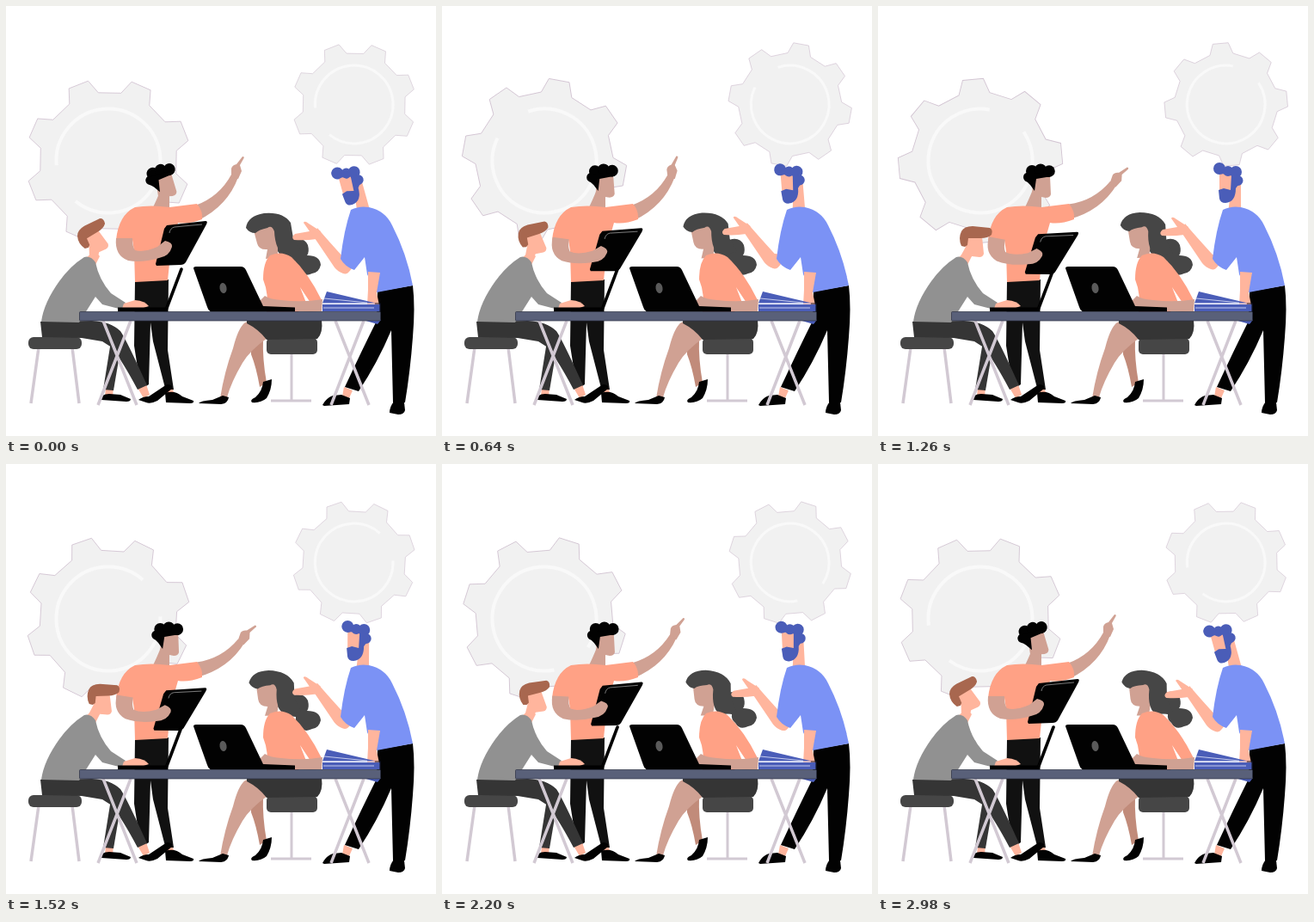
Write an HTML page that moves like this. It is 500x500 px and loops after 3 s.

```html
<!DOCTYPE html>
<html lang="en">
<head>
<meta charset="utf-8">
<title>Team at work</title>
<style>
html, body { margin: 0; width: 100%; height: 100%; overflow: hidden; background: #fff; }
svg { display: block; width: 100vw; height: 100vh; }
.tan { fill: #d0a193; }
.skin { fill: #ffb59d; }
.coral { fill: #ffa185; }
.black { fill: #020202; }
.dark { fill: #353535; }
.hair { fill: #464646; }
.blue { fill: #4a5db8; }
.leg { fill: none; stroke: #d2c9d3; stroke-width: 3.5; }
</style>
</head>
<body>
<svg viewBox="0 0 500 500">
  <defs>
    <g id="gear">
      <path id="teeth" fill="#f1f1f1" stroke="#d3c5d3" stroke-width=".9"/>
      <circle r="60.5" pathLength="360" stroke-dasharray="314 46" transform="rotate(175)" fill="none" stroke="#f9f9f9" stroke-width="4"/>
    </g>
  </defs>
  <g transform="translate(119 180)"><use href="#gear" class="spin"/></g>
  <g transform="translate(404.7 114.5) scale(.75)"><use href="#gear" class="spin"/></g>

  <!-- standing presenter -->
  <path class="tan" d="M181 211L190 217 190 236H170Q175 226 181 211Z"/>
  <g id="presenterHead">
    <path class="tan" d="M181 198H200L201 219Q200 223 195 223L190 222 188 230 178 228Z"/>
    <g class="black">
      <circle cx="174.500" cy="199" r="5.500"/><circle cx="179" cy="192" r="7"/><circle cx="189" cy="190.500" r="7"/><circle cx="199" cy="192" r="6.800"/>
      <path d="M173 195L203 194Q204 199 196 199L184 201 183 208 182 215 177 208 172 203Z"/>
    </g>
  </g>
  <path fill="#111" d="M150 320L189 318 188 400 195 446 186 448 171 390 168 368 166 440 157 446 149 395Z"/>
  <path class="skin" d="M186 446L194 446 196 452 187 453Z"/>
  <path class="black" d="M185 450Q196 446 205 454L218 459Q219 462 214 462L186 461Z"/>
  <g id="pointArm">
    <path class="tan" d="M220 232Q248 222 262 196L270 199Q258 232 224 249Z"/>
    <path id="pointHand" class="tan" d="M262 199V189Q263 185 268 184L275 175Q278 175 276 178L272 185 274 192 270 201Z"/>
  </g>
  <path class="coral" d="M150 234Q168 231 190 234L222 230Q229 238 228 248Q212 254 200 252L192 280 188 319 150 321 149 285 147 272 128 272Q131 243 150 234Z"/>
  <path id="board" class="black" d="M187 255L232 250Q235 250 233 254L209 298Q207 301 203 301L175 302 174 300 184 259Z"/>
  <path id="boardEdge" d="M190 264Q191 258 196 257L228 254" fill="none" stroke="#858585" stroke-width=".9"/>
  <path id="holdArm" class="tan" d="M128 270Q126 290 142 296Q158 299 178 293Q190 291 193 280Q194 275 185 273L176 280Q160 287 150 284Q147 280 147 270Z"/>

  <!-- seated man -->
  <path class="leg" d="M38 397L29 462M77 397L85 462"/>
  <rect class="hair" x="26" y="385" width="62" height="14" rx="6"/>
  <path class="skin" d="M116 444L125 444 124 454 115 454Z"/>
  <path class="black" d="M111 458Q110 451 120 451L133 452 145 457Q145 460 140 460Z"/>
  <path class="dark" d="M122 390L134 394 125 447 113 446Z"/>
  <path class="skin" d="M153 444L163 440 167 452 160 456Z"/>
  <path class="black" d="M154 458Q159 454 166 454L187 440Q194 440 193 445L176 459Q168 463 163 461Z"/>
  <path class="dark" d="M40 367L100 366Q122 367 133 378Q140 388 164 441L153 446Q136 414 123 397L112 390 88 386 42 385Z"/>
  <path class="skin" d="M91 295L103 284 109 291 104 301Z"/>
  <g id="sitterHead">
    <path class="skin" d="M102 268H121L123 288Q122 292 118 292L109 291 102 298 96 291 102 280Z"/>
    <path fill="#a8674f" d="M97 279Q93 270 97 262Q100 256 110 256L130 258Q134 260 132 266Q128 270 119 270H105L104 278 101 280Z"/>
  </g>
  <path fill="#919191" d="M91 292Q98 290 104 298Q108 318 122 334L139 345 135 353 112 347 104 338 85 368 41 367Q44 345 62 320Q75 302 91 292Z"/>
  <path class="skin" d="M137 346L150 342Q162 343 166 349L160 351 135 352Z"/>
  <path d="M204 306L187 351" stroke="#000" stroke-width="3.6" stroke-linecap="round"/>
  <rect x="130" y="350.5" width="58" height="5"/>

  <!-- seated woman -->
  <path fill="none" stroke="#d2c9d3" stroke-width="3" d="M332 404V459M308 459H355"/>
  <rect class="hair" x="303" y="386" width="59" height="19" rx="5"/>
  <path fill="#c18b7a" d="M285 386L299 387Q298 410 303 438L295 443Q291 420 285 405Z"/>
  <path class="black" d="M299 437L309 434Q309 446 303 456Q296 462 286 461Q283 458 290 455Q298 448 299 437Z"/>
  <path class="tan" d="M288 365L304 386Q284 400 275 415Q262 437 257 455L249 456Q254 425 264 398Q270 374 278 368Z"/>
  <path class="black" d="M224 462Q226 459 240 458L252 453 259 455Q258 462 250 463Z"/>
  <path class="dark" d="M280 365H367Q369 380 362 387L303 388Q294 376 280 369Z"/>
  <path id="curls" class="hair" d="M320 246Q332 254 334 266Q346 262 351 272Q353 280 350 284Q365 284 366 295Q364 304 356 305Q346 310 341 301Q336 297 337 291Q320 290 314 275Z"/>
  <g id="womanHead">
    <path class="tan" d="M288 261L306 252 316 262 316 292 302 294 304 283Q294 284 292 276Z"/>
    <path class="hair" d="M279 258Q281 244 300 241Q322 239 331 252L334 270 343 284 325 290Q313 285 312 262Q309 254 304 258Q294 260 290 264Q283 264 279 258Z"/>
  </g>
  <path class="coral" d="M307 290Q320 284 332 292Q352 311 367 342L354 345 342 327 349 345 340 356H303Q306 335 299 318Q299 298 307 290Z"/>
  <path class="tan" d="M368 341L367 355Q340 357 297 350L293 345 301 337Q306 341 320 342Q345 345 368 341Z"/>
  <path class="black" d="M218 305Q218 303 221 303H273Q277 303 279 307L299 349 336 350.500V355.500H238Q235 354 234 350Z"/>
  <ellipse cx="252.500" cy="328" rx="4" ry="6" fill="#5a5a5a" transform="rotate(-10 252.500 328)"/>

  <!-- bearded man -->
  <path class="skin" d="M393 443L403 447 399 456 391 454ZM450 456H463V464H450Z"/>
  <path class="black" d="M368 464Q372 456 380 453L390 452 400 456 399 463 370 465ZM446 473Q446 466 451 460L463 461 464 470Q463 475 456 475Z"/>
  <path class="black" d="M432 332L473 325Q476 350 473 385Q470 425 464 461H450L448 377Q432 415 410 448L394 443Q414 400 431 366Z"/>
  <g id="beardHead">
    <path class="skin" d="M397 195H412L422 205 422 242H407L409 224 397 220Z"/>
    <g class="blue">
      <circle cx="397" cy="189" r="7"/><circle cx="407" cy="192" r="6"/><circle cx="416" cy="193" r="7"/><circle cx="418.500" cy="203" r="6"/>
      <path d="M395 190L412 190 422 204 416 212Q416 228 404 229Q398 229 397 224L396 214 402 212 410 214 411 196 397 195Z"/>
    </g>
  </g>
  <g id="raisedArm" class="skin">
    <path d="M362 258Q373 271 394 294L406 295Q400 314 392 311Q386 309 382 304L359 270Z"/>
    <path d="M361 271Q348 273 335 272Q331 269 336 265L353 262 346 252Q347 249 352 253L366 262Z"/>
  </g>
  <path fill="#7b92f5" d="M401 237Q411 232 422 234Q441 238 449 255Q466 288 473 325L431 333 420 312 417 292 405 307Q394 303 389 294Q393 260 401 237Z"/>
  <path class="skin" d="M421 309L435 310 431 333 434 348H420L421 330Z"/>

  <!-- table and books -->
  <path class="blue" d="M415 365H436L432 370Z"/>
  <path class="blue" d="M373 332L430 345.500H368ZM368 347H435V355H368Z"/>
  <path d="M370 340L420 345M368 346.200H428M369 351H428" stroke="#e4e8fa" stroke-width=".8"/>
  <path d="M429 346H435V355" fill="none" stroke="#15182c" stroke-width="1.200"/>
  <path class="leg" d="M113 366L152 464M145 366L107 464M383 366L422 464M416 366L378 464"/>
  <rect x="85.500" y="355.500" width="350" height="10.500" rx="1" fill="#596079" stroke="#2b3042" stroke-width=".7"/>
</svg>
<script>
const LOOP = 3000;
const TIMES = [0, 400, 900, 1260, 1800, 2580];
const $ = id => document.getElementById(id);
const put = (id, value) => $(id).setAttribute('transform', value);
const clamp = x => Math.max(0, Math.min(1, x));

// Smooth periodic curve through one value per entry of TIMES
function curve(values) {
  const n = TIMES.length;
  const point = i => {
    const turn = Math.floor(i / n), k = i - turn * n;
    return [TIMES[k] + turn * LOOP, values[k]];
  };
  const slope = i => {
    const [a, p] = point(i - 1), [, v] = point(i), [b, q] = point(i + 1);
    return (v - p) * (q - v) <= 0 ? 0 : (q - p) / (b - a);
  };
  return t => {
    let i = n - 1;
    while (TIMES[i] > t) i--;
    const [a, p] = point(i), [b, q] = point(i + 1);
    const h = b - a, s = (t - a) / h, r = 1 - s;
    return r * r * ((1 + 2 * s) * p + s * h * slope(i)) +
           s * s * ((1 + 2 * r) * q - r * h * slope(i + 1));
  };
}

const sitter = curve([-31, -23.5, -10, 0, -5, -23.5]);
const presenter = curve([-14, -5, 0, 0, 1, -4]);
const beard = curve([-15.5, -9, -1, 0, .5, -9]);
const board = curve([0, .38, .92, 1, .5, .1]);
const point = curve([0, 0, 3, 11.5, 10, 0]);
const wrist = curve([0, -14, 2, 8, 7, 0]);
const armX = curve([0, -4, -9.5, -5, 3, 3]);
const armY = curve([0, -4, -7, -5, -2, -1]);

function toothPath() {
  const profile = [[-18, -78], [-12, -95], [12, -95], [18, -78]];
  const points = [];
  for (let i = 0; i < 8; i++) {
    const a = (i * 45 - 21.5) * Math.PI / 180, c = Math.cos(a), s = Math.sin(a);
    for (const [x, y] of profile) points.push([x * c - y * s, x * s + y * c]);
  }
  return 'M' + points.join('L') + 'Z';
}
$('teeth').setAttribute('d', toothPath());
const gears = document.querySelectorAll('.spin');

function draw(t) {
  gears.forEach(g => g.setAttribute('transform', `rotate(${t / LOOP * 360})`));
  put('sitterHead', `rotate(${sitter(t)} 100 290)`);
  put('presenterHead', `rotate(${presenter(t)} 186 228)`);
  put('beardHead', `rotate(${beard(t)} 411 235)`);
  put('pointArm', `rotate(${point(t)} 228 240)`);
  put('pointHand', `rotate(${wrist(t)} 267 198)`);
  put('raisedArm', `translate(${armX(t)} ${armY(t)})`);

  const k = board(t);
  for (const id of ['board', 'boardEdge'])
    put(id, `translate(${-2 * k} ${11 * k}) rotate(${3 * k} 200 277)`);
  put('holdArm', `rotate(${11 * k} 138 275)`);

  // The woman's head drifts, then jumps back as the loop restarts
  put('womanHead', `rotate(${8.5 * clamp(t / 1900)} 312 285)`);
  put('curls', `translate(0 ${6 - 6 * clamp((t - 1260) / 540)})`);
}

const start = performance.now();
function tick() {
  draw((performance.now() - start) % LOOP);
  requestAnimationFrame(tick);
}
tick();
</script>
</body>
</html>
```
